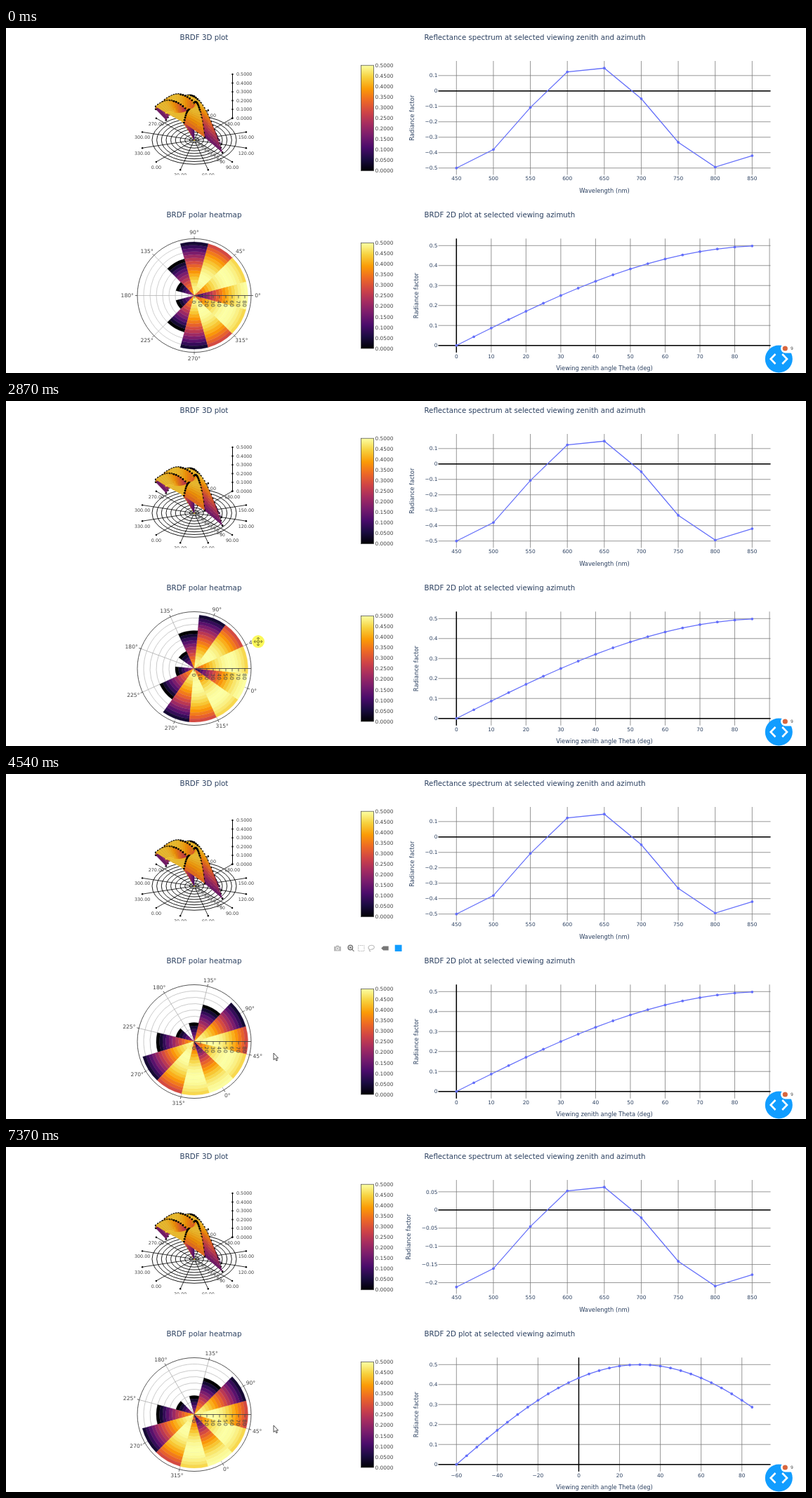
An HTML page for the animation above (8 s loop, 1139x492 px).

```html
<!DOCTYPE html>
<html lang="en">
<head>
<meta charset="utf-8">
<title>BRDF dashboard</title>
<style>
html, body { margin: 0; width: 100%; height: 100%; overflow: hidden; background: #fff; }
svg { display: block; width: 1139px; height: 492px; font-family: "DejaVu Sans", sans-serif; }
</style>
</head>
<body>
<svg id="stage" viewBox="0 0 1139 492"></svg>
<script>
const LOOP = 8000, NAVY = '#2a3f5f', GRAY = '#444', BLUE = '#119dff';
const stage = document.getElementById('stage');
const rad = d => d * Math.PI / 180;
const range = (from, to, step) =>
  Array.from({ length: Math.round((to - from) / step) + 1 }, (_, i) => from + i * step);
const clamp01 = v => Math.max(0, Math.min(1, v));

function el(tag, attrs, parent = stage) {
  const node = document.createElementNS('http://www.w3.org/2000/svg', tag);
  for (const k in attrs) node.setAttribute(k, attrs[k]);
  parent.appendChild(node);
  return node;
}
const group = (parent = stage, attrs = {}) => el('g', attrs, parent);
const line = (x1, y1, x2, y2, stroke, width, parent) =>
  el('line', { x1, y1, x2, y2, stroke, 'stroke-width': width }, parent);
const dot = (cx, cy, r, fill, parent) => el('circle', { cx, cy, r, fill }, parent);
const path = (d, attrs, parent) => el('path', { d, fill: 'none', ...attrs }, parent);

// Text centred vertically on y
function label(str, x, y, size, anchor, fill, parent, turn = 0) {
  const node = el('text', {
    x, y, dy: size * 0.36, 'font-size': size, 'text-anchor': anchor, fill,
    ...(turn && { transform: `rotate(${turn} ${x} ${y})` })
  }, parent);
  node.textContent = str;
  return node;
}
const show = (node, on) => node.setAttribute('visibility', on ? 'visible' : 'hidden');

// Inferno colour scale
const INFERNO = ['000004', '1b0c41', '4a0c6b', '781c6d', 'a52c60',
  'cf4446', 'ed6925', 'fb9b06', 'f7d13d', 'fcffa4'];
function inferno(v, shade = 1) {
  const p = clamp01(v) * (INFERNO.length - 1), i = Math.min(INFERNO.length - 2, Math.floor(p));
  const part = (n, c) => parseInt(INFERNO[n].substr(c * 2, 2), 16);
  return `rgb(${[0, 1, 2].map(c =>
    Math.round((part(i, c) + (part(i + 1, c) - part(i, c)) * (p - i)) * shade))})`;
}
// Radiance factor for zenith theta and azimuth phi in -180..180
const radiance = (theta, phi) => 0.5 * Math.sin(rad(theta + Math.abs(phi)));

function colorbar(top) {
  const h = 150.5;
  el('rect', { x: 505.5, y: top, width: 18, height: h, fill: 'url(#inferno)', stroke: GRAY, 'stroke-width': 0.7 });
  for (let i = 0; i <= 10; i++)
    label((0.5 - i * 0.05).toFixed(4), 525.5, top + i * h / 10, 7.4, 'start', GRAY);
}

// ---- 3D plot ----
function plot3d() {
  label('BRDF 3D plot', 282, 13.5, 10.3, 'middle', NAVY);
  const g = group(stage, { 'clip-path': 'url(#scene)' });
  const cx = 268, cy = 159.8;
  const ground = (phi, r) => {
    const a = rad(135 - phi);
    return [cx + r * Math.cos(a), cy + r * 0.575 * Math.sin(a)];
  };
  for (let k = 1; k <= 9; k++)
    el('ellipse', { cx, cy, rx: k * 6.67, ry: k * 3.83, fill: 'none', stroke: '#000', 'stroke-width': 0.9 }, g);
  for (let phi = 0; phi < 360; phi += 30) {
    const [x, y] = ground(phi, 76.5);
    line(cx, cy, x, y, '#000', 0.8, g);
    dot(x, y, 1.2, '#000', g);
    label(phi.toFixed(2), x, y + 7.6, 6.4, 'middle', GRAY, g);
  }
  line(322.5, 66, 322.5, 128.5, '#000', 1, g);
  for (let i = 0; i <= 5; i++) {
    dot(322.5, 128.5 - i * 12.5, 1.2, '#000', g);
    label((i / 10).toFixed(4), 328, 128.5 - i * 12.5, 6.4, 'start', GRAY, g);
  }
  for (let k = 1; k <= 9; k++)
    label(k * 10, cx + 4.45 * k, cy + 3.5 * k, 6, 'middle', GRAY, g);

  const point = (theta, phi) => {
    const r = theta / 1.5, v = radiance(theta, phi), [x, y] = ground(phi, r);
    return { x, y: y - 124 * v, v, depth: 0.82 * r * Math.sin(rad(135 - phi)) + 87 * v };
  };
  const items = [];
  for (const phi of range(-150, 150, 30)) {
    for (const theta of range(0, 85, 5)) {
      const p = point(theta, phi);
      if (p.v < -1e-6) continue;
      items.push({ depth: p.depth + 2, draw: () =>
        dot(p.x, p.y, phi ? 1.45 : 1.3, phi ? '#000' : '#f7d13d', g) });
      if (phi === 150 || theta === 85) continue;
      const quad = [p, point(theta + 5, phi), point(theta + 5, phi + 30), point(theta, phi + 30)];
      if (quad.some(q => q.v < -1e-6)) continue;
      const mean = key => quad.reduce((s, q) => s + q[key], 0) / 4;
      const fill = inferno(mean('v') * 1.8, 0.93);
      items.push({ depth: mean('depth'), draw: () => el('polygon', {
        points: quad.map(q => `${q.x},${q.y}`).join(' '), fill, stroke: fill, 'stroke-width': 0.4 }, g) });
    }
  }
  items.sort((a, b) => a.depth - b.depth).forEach(item => item.draw());
}

// ---- Polar heatmap ----
const CX = 268, CY = 381.5, R = 81;
function polarPlot() {
  const root = group();
  label('BRDF polar heatmap', 282, 266.5, 10.3, 'middle', NAVY, root);
  const rotor = group(root);
  const at = (r, deg) => `${CX + r * Math.cos(rad(deg))} ${CY - r * Math.sin(rad(deg))}`;
  for (let k = 1; k < 9; k++)
    el('circle', { cx: CX, cy: CY, r: k * 9, fill: 'none', stroke: '#bbb', 'stroke-width': 0.7 }, rotor);
  for (let a = 0; a < 360; a += 45)
    path(`M${at(0, a)}L${at(R, a)}`, { stroke: '#aaa', 'stroke-width': 0.7 }, rotor);
  for (const phi of range(-150, 180, 30))
    for (const theta of range(5, 85, 5)) {
      const v = radiance(theta, phi), r0 = (theta - 5) * 0.9, r1 = theta * 0.9;
      if (v < -1e-6) continue;
      const fill = inferno(v * 2), a = phi - 15, b = phi + 15;
      path(`M${at(r0, a)}L${at(r1, a)}A${r1} ${r1} 0 0 0 ${at(r1, b)}L${at(r0, b)}A${r0} ${r0} 0 0 1 ${at(r0, a)}Z`,
        { fill, stroke: fill, 'stroke-width': 0.25 }, rotor);
    }
  for (let a = 0; a < 360; a += 45)
    path(`M${at(R, a)}L${at(R + 3, a)}`, { stroke: GRAY, 'stroke-width': 0.8 }, rotor);
  el('circle', { cx: CX, cy: CY, r: R, fill: 'none', stroke: GRAY, 'stroke-width': 0.9 }, root);
  line(CX, CY, CX + R, CY, GRAY, 0.9, root);
  for (let k = 0; k <= 8; k++) {
    const x = CX + k * 9;
    line(x, CY, x, CY + 4, GRAY, 0.8, root);
    label(k * 10, x, CY + 7, 7.3, 'start', GRAY, root, 90);
  }
  const names = range(0, 315, 45).map(a => ({
    a, half: a === 0 ? 4.5 : a < 100 ? 6.8 : 9.3, node: label(a + '°', 0, 0, 7.6, 'middle', GRAY, root) }));
  return {
    root,
    turn(deg) {
      rotor.setAttribute('transform', `rotate(${-deg} ${CX} ${CY})`);
      for (const { a, half, node } of names) {
        const c = Math.cos(rad(a + deg)), s = Math.sin(rad(a + deg));
        node.setAttribute('x', CX + c * (R + 5 + half));
        node.setAttribute('y', CY - s * (R + 9));
      }
    }
  };
}

// ---- Line charts ----
function chart(o) {
  const g = group(), left = 615.5, right = 1088.5;
  const px = v => o.x0 + (v - o.xs[0]) * o.xScale, py = v => o.zero - v * o.yScale;
  const text = v => String(+v.toFixed(2)).replace('-', '−');
  label(o.title, 595.5, o.top - 33.5, 10.2, 'start', NAVY, g);
  for (const v of o.grid) line(px(v), o.top, px(v), o.bottom, '#7d7d7d', 0.8, g);
  for (const v of o.ticks) line(left, py(v), right, py(v), '#7d7d7d', 0.8, g);
  line(left, o.zero, right, o.zero, '#000', 1.5, g);
  if (o.xs[0] <= 0) line(px(0), o.top, px(0), o.bottom, '#000', 1.5, g);
  for (const v of o.grid) if (v !== 90) label(text(v), px(v), o.bottom + 5.3, 7.4, 'middle', NAVY, g);
  for (const v of o.ticks) label(text(v), 614.5, py(v), 7.4, 'end', NAVY, g);
  label(o.xTitle, 852, o.bottom + 22.5, 8.3, 'middle', NAVY, g);
  label('Radiance factor', o.yTitleX, (o.top + o.bottom) / 2, 8.3, 'middle', NAVY, g, -90);
  const pts = o.xs.map((x, i) => [px(x), py(o.ys[i])]);
  el('polyline', { points: pts.join(' '), fill: 'none', stroke: '#636efa', 'stroke-width': 1.25 }, g);
  for (const [x, y] of pts) dot(x, y, 1.9, '#636efa', g);
  return g;
}
const SPECTRUM = [-0.5, -0.38, -0.107, 0.124, 0.148, -0.05, -0.333, -0.494, -0.42];
const spectrumChart = (gain, ticks, yTitleX) => chart({
  title: 'Reflectance spectrum at selected viewing zenith and azimuth', xTitle: 'Wavelength (nm)',
  top: 47, bottom: 209.5, zero: 89.8, yScale: 219.8 / gain, ticks, yTitleX,
  x0: 641.3, xScale: 1.0526, xs: range(450, 850, 50), grid: range(450, 850, 50),
  ys: SPECTRUM.map(v => v * gain)
});
const zenithChart = (azimuth, xScale, grid) => {
  const xs = range(-azimuth, 85, 5);
  return chart({
    title: 'BRDF 2D plot at selected viewing azimuth', xTitle: 'Viewing zenith angle Theta (deg)',
    top: 300.3, bottom: 462.8, zero: 452.7, yScale: 284.8, ticks: range(0, 0.5, 0.1), yTitleX: 584,
    x0: 641.3, xScale, xs, grid, ys: xs.map(t => radiance(t + azimuth, 0))
  });
};

// ---- Loading bars ----
function loader(cx, cy, from, to) {
  const g = group();
  const bars = range(0, 4, 1).map(i => el('rect', { x: cx - 13.8 + i * 6, width: 3.6, fill: BLUE }, g));
  return t => {
    show(g, t >= from && t < to);
    bars.forEach((bar, i) => {
      const phase = ((t - from) / 1200 - i / 12 + 10) % 1;
      const k = Math.max(0, 1 - Math.abs(phase - 0.2) / 0.2);
      const h = 25 * (0.4 + 0.6 * k * k * (3 - 2 * k));
      bar.setAttribute('height', h);
      bar.setAttribute('y', cy - h / 2);
    });
  };
}

function modebar() {
  const g = group(), pale = '#b9b9b9', dark = '#777';
  path('M467 246h2.5l1-1.5h3l1 1.5h2.5v6.5h-10z', { fill: pale }, g);
  el('circle', { cx: 472, cy: 249, r: 1.9, fill: pale, stroke: '#fff', 'stroke-width': 0.9 }, g);
  el('circle', { cx: 490.3, cy: 247.5, r: 3.2, fill: 'none', stroke: dark, 'stroke-width': 1.5 }, g);
  path('M492.5 249.8l3 3M488.7 247.5h3.2M490.3 245.9v3.2', { stroke: dark, 'stroke-width': 1.2 }, g);
  el('rect', { x: 501.5, y: 244.5, width: 8.5, height: 8, fill: 'none', stroke: pale, 'stroke-dasharray': '1.5 1' }, g);
  path('M517.5 250.5C514 247 517 244 521 244.3C526 245 525 250 520 250.2C517 250 516 253 519.5 252.8',
    { stroke: pale, 'stroke-width': 1.1 }, g);
  path('M534.2 248.5l3-3h7.4v6h-7.4z', { fill: dark }, g);
  el('rect', { x: 553.7, y: 243.7, width: 9.8, height: 9.3, fill: BLUE }, g);
  return g;
}

function debugButton() {
  dot(1100.3, 472, 19.5, BLUE);
  path('M1095.5 465l-6.8 7 6.8 7M1105.2 465l6.8 7-6.8 7', { stroke: '#fff', 'stroke-width': 2.6 });
  el('rect', { x: 1103, y: 450.5, width: 22, height: 13, rx: 6.5, fill: '#fff' });
  dot(1109.3, 457, 3.6, '#d9673f');
  label('9', 1119, 457, 6, 'middle', GRAY);
}

function pointers() {
  const root = group();
  const cross = group(root), halo = group(root), move = group(root), arrow = group(root);
  path('M-7 0H7M0 -7V7', { stroke: '#08081c', 'stroke-width': 1.5 }, cross);
  dot(0, 0, 9, '#fbf85a', halo);
  const arm = 'M0 -2V-5M-2 -4L0 -6L2 -4';
  for (const a of [0, 90, 180, 270])
    path(arm, { stroke: '#77742a', 'stroke-width': 1, transform: `rotate(${a})` }, move);
  el('rect', { x: -1.2, y: -1.2, width: 2.4, height: 2.4, fill: 'none', stroke: '#77742a', 'stroke-width': 0.8 }, move);
  path('M0 0V9.6L2.3 7.6L3.9 11L5.4 10.3L3.9 7.1H6.6Z',
    { fill: '#fff', stroke: '#222', 'stroke-width': 0.8 }, arrow);
  return t => {
    show(cross, t >= 1050 && t < 1920);
    show(halo, t >= 2210 && t < 3590);
    show(move, t >= 1920 && t < 3590);
    show(arrow, t >= 3590);
    const [x, y] = track(POINTER, t);
    root.setAttribute('transform', `translate(${x} ${y})`);
  };
}

// Linear interpolation in rows of [time, ...values]
function track(rows, t) {
  const i = rows.findIndex(row => row[0] > t);
  if (i === 0) return rows[0].slice(1);
  if (i < 0) return rows[rows.length - 1].slice(1);
  const a = rows[i - 1], b = rows[i], k = (t - a[0]) / (b[0] - a[0]);
  return a.slice(1).map((v, n) => v + (b[n + 1] - v) * k);
}
const POINTER = [[1050, 372, 488], [1210, 340.5, 409], [1500, 333, 340], [1820, 329, 312.5], [1920, 328, 313],
  [2210, 329, 312], [2440, 332.5, 314.5], [2650, 345, 326], [2870, 359, 343], [3150, 373, 370], [3430, 381, 398],
  [5930, 381, 398], [6200, 381, 397]];
const ROTATION = [[2450, 0], [2650, -8], [2870, -20.3], [3150, -42], [3430, -58.5], [5930, -58.5], [5931, -60]];
const MODEBAR = [[1050, 0], [1290, 1], [2210, 1], [2470, 0], [3780, 0], [4080, 1], [5930, 1], [5931, 0]];
const BUSY = { spectrum: [5860, 7000], polar: [5930, 7200], zenith: [5930, 7300] };

const defs = el('defs', {});
const gradient = el('linearGradient', { id: 'inferno', x1: 0, y1: 1, x2: 0, y2: 0 }, defs);
INFERNO.forEach((c, i) => el('stop', { offset: i / 9, 'stop-color': '#' + c }, gradient));
el('rect', { x: 150, y: 30, width: 300, height: 179.5 }, el('clipPath', { id: 'scene' }, defs));

plot3d();
colorbar(53.2);
const polar = polarPlot();
const polarScale = group();
colorbar(306.5);
const spectra = [spectrumChart(1, range(-0.5, 0.1, 0.1), 578), spectrumChart(0.424, range(-0.2, 0.05, 0.05), 573)];
const zeniths = [zenithChart(0, 4.953, range(0, 90, 10)), zenithChart(60, 2.903, range(-60, 80, 20))];
// The polar colour bar hides together with its plot
const barNodes = [];
for (let n = polarScale.nextSibling; n !== spectra[0]; n = n.nextSibling) barNodes.push(n);
barNodes.forEach(n => polarScale.appendChild(n));

const loaders = [
  loader(850.4, 110, ...BUSY.spectrum),
  loader(282, 363, ...BUSY.polar),
  loader(850.4, 363, ...BUSY.zenith)
];
const bar = modebar();
debugButton();
const movePointer = pointers();

function render(t) {
  const swap = (pair, [from, to]) => {
    show(pair[0], t < from);
    show(pair[1], t >= to);
  };
  swap(spectra, BUSY.spectrum);
  swap(zeniths, BUSY.zenith);
  const idle = t < BUSY.polar[0] || t >= BUSY.polar[1];
  show(polar.root, idle);
  show(polarScale, idle);
  polar.turn(track(ROTATION, t)[0]);
  bar.setAttribute('opacity', track(MODEBAR, t)[0]);
  loaders.forEach(update => update(t));
  movePointer(t);
}
const start = performance.now();
function tick() {
  render((performance.now() - start) % LOOP);
  requestAnimationFrame(tick);
}
render(0);
requestAnimationFrame(tick);
</script>
</body>
</html>
```
